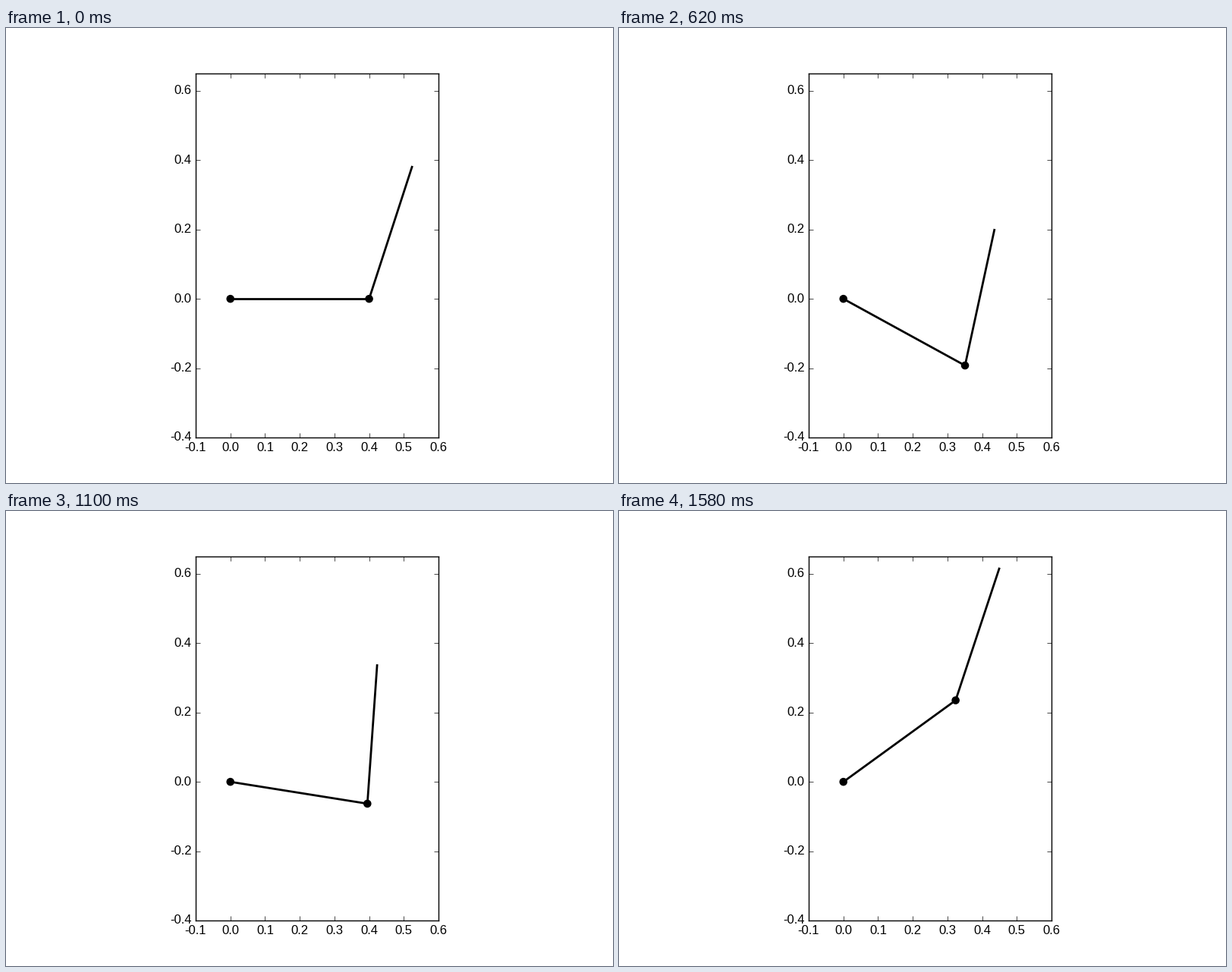
Write a matplotlib script that moves like this. It is 800x600 px and loops after 1600 ms.

```python
import numpy as np
import matplotlib.pyplot as plt
from matplotlib.animation import FuncAnimation
from matplotlib.patches import Circle

FRAMES, INTERVAL = 80, 20
LINK = 0.4

# Key poses: frame, upper arm and forearm angle in degrees
POSES = [
    (0, 0, 72), (10, 9.07, 68.9), (16, 16.8, 65.4),
    (23, 5.36, 72.1), (31, -28.74, 77.8), (41, -56.2, 73.3),
    (48, -37.94, 82.2), (63, 19.29, 82), (79, 36, 71.7),
]

plt.rcParams.update({
    "font.family": "Liberation Sans",
    "font.size": 12,
    "axes.unicode_minus": False,
    "ytick.alignment": "center",
})


def glide(poses):
    """Angles of every frame: a cubic spline through poses, at rest at both ends."""
    poses = np.array(poses, float)
    t, y = poses[:, 0], poses[:, 1:]
    h = np.diff(t)
    rise = np.diff(y, axis=0) / h[:, None]
    n = len(t)
    system, rhs = np.eye(n), np.zeros_like(y)
    for i in range(1, n - 1):
        a, b = 1 / h[i - 1], 1 / h[i]
        system[i, i - 1:i + 2] = a, 2 * (a + b), b
        rhs[i] = 3 * (rise[i - 1] * a + rise[i] * b)
    slope = np.linalg.solve(system, rhs)

    x = np.arange(FRAMES)
    k = np.clip(np.searchsorted(t, x, side="right") - 1, 0, n - 2)
    width = h[k, None]
    s = (x - t[k])[:, None] / width
    m0, m1 = slope[k] * width, slope[k + 1] * width
    step = y[k + 1] - y[k]
    return np.radians(y[k] + s * (m0 + s * (3 * step - 2 * m0 - m1
                                            + s * (m0 + m1 - 2 * step))))


angles = glide(POSES)

fig = plt.figure(figsize=(8, 6), dpi=100, facecolor="white")
ax = fig.add_axes([250 / 800, 60 / 600, 320 / 800, 480 / 600])
ax.set_xlim(-0.1, 0.6)
ax.set_ylim(-0.4, 0.65)
ax.set_xticks([i / 10 for i in range(-1, 7)])
ax.set_yticks([i / 10 for i in range(-4, 7, 2)])
ax.xaxis.set_major_formatter("{x:.1f}")
ax.yaxis.set_major_formatter("{x:.1f}")
ax.tick_params(direction="in", length=4, width=0.5, pad=4,
               top=True, right=True)
for spine in ax.spines.values():
    spine.set_linewidth(1)

links = [ax.plot([], [], color="black", lw=2)[0] for _ in range(2)]
joints = [ax.add_patch(Circle((0, 0), 0.01, facecolor="black",
                              edgecolor="black", lw=1)) for _ in range(2)]


def draw(i):
    start = np.zeros(2)
    for link, joint, angle in zip(links, joints, angles[i]):
        end = start + LINK * np.array([np.cos(angle), np.sin(angle)])
        link.set_data(*zip(start, end))
        joint.center = tuple(start)
        start = end
    return links + joints


anim = FuncAnimation(fig, draw, frames=FRAMES, interval=INTERVAL,
                     init_func=lambda: draw(0), repeat=True, repeat_delay=0)
plt.show()
```
